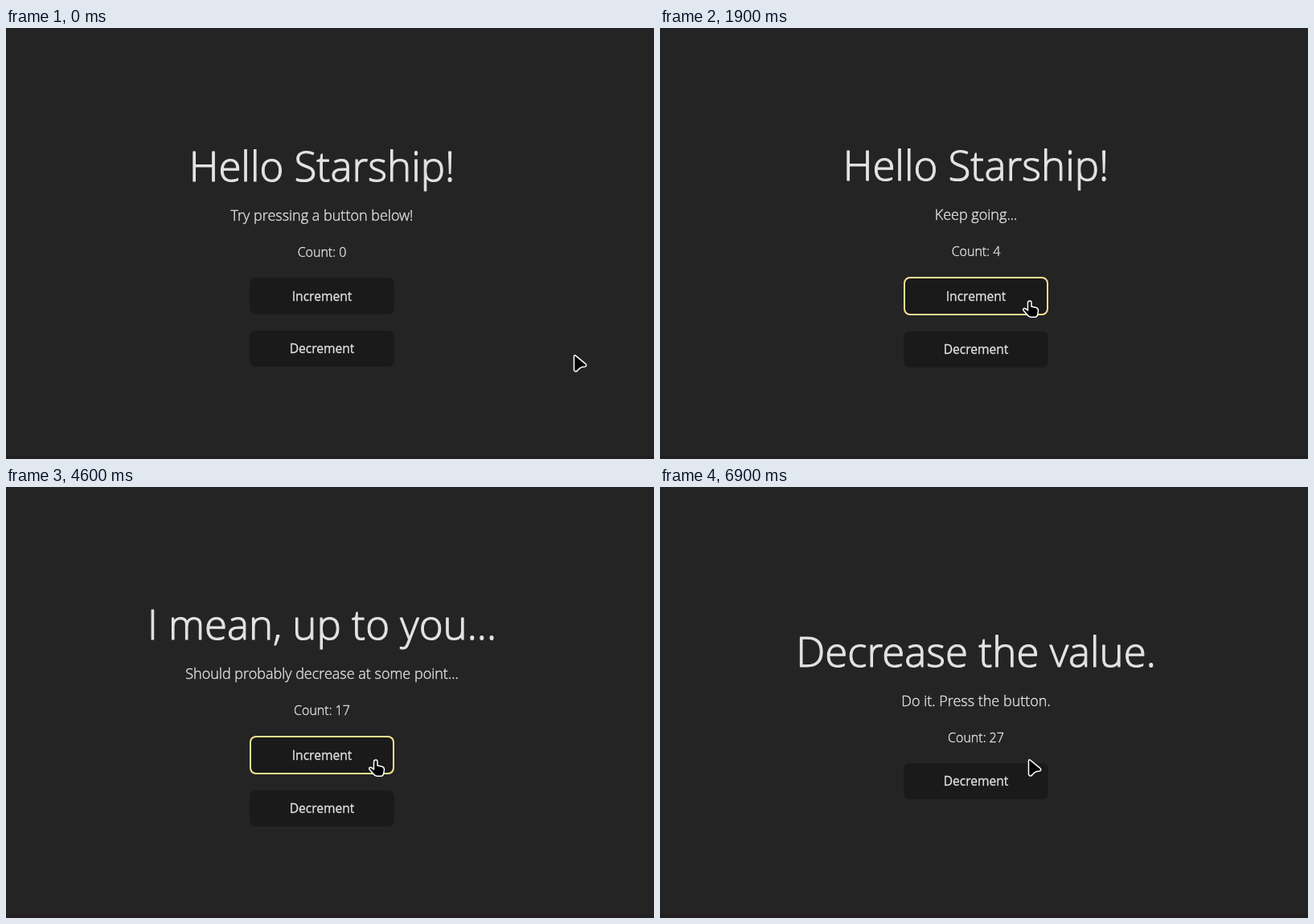
An HTML page that plays this animation: 806x537 px, repeating every 8 s.

```html
<!DOCTYPE html>
<html lang="en">
<head>
<meta charset="utf-8">
<title>Counter</title>
<style>
  html, body { margin: 0; width: 100%; height: 100%; overflow: hidden; background: #242424; }
  svg { display: block; }
  text {
    font-family: "Open Sans", "Noto Sans", sans-serif; font-weight: 300; text-anchor: middle;
    fill: #e3e3e3; stroke: #e3e3e3; stroke-width: .4; stroke-linejoin: round;
  }
  #title { font-size: 51px; stroke-width: 1.1; }
  #hint { font-size: 18px; }
  #count { font-size: 16px; }
  .label { font-size: 15.6px; font-weight: 500; stroke-width: .3; }
  .face { fill: #1a1a1a; }
  #ring { fill: none; stroke: #f7e290; stroke-width: 2; }
  #pointer path { fill: #000; stroke: #fff; stroke-width: 1.5; stroke-linejoin: round; }
</style>
</head>
<body>
<svg width="806" height="537" viewBox="0 0 806 537">
  <rect width="806" height="537" fill="#242424"/>
  <rect y="533" width="806" height="4" fill="#211f20"/>
  <text id="title" x="393"></text>
  <text id="hint" x="393"></text>
  <text id="count" x="393"></text>
  <g id="inc">
    <rect id="incFace" class="face"/>
    <rect id="ring" x="304" y="311" width="178" height="46" rx="7"/>
    <text class="label" x="393" y="340">Increment</text>
  </g>
  <g id="dec">
    <rect class="face" x="303" width="180" height="45" rx="8"/>
    <text class="label" x="393" y="28">Decrement</text>
  </g>
  <g id="pointer">
    <path id="arrow" d="M0 1.5Q0 -1 2.2 .3L14.6 10.6Q16.4 13 13.5 14Q8 14 4.6 18.6Q1.5 21.5 0 18Z"/>
    <path id="hand" transform="translate(1.5)" d="M-2.5 12V2.2Q-2.3 0 0 0Q2 0 2 2.2V7L7.5 8.2Q10.5 9 10.5 12L9.8 16.5Q9 20.3 6.5 20.3H1.5Q-1 20.3 -3 17.5L-8 11.7Q-9 9.5 -6.5 9.2Q-5 9.2 -2.5 12Z"/>
  </g>
</svg>
<script>
const LOOP = 8000, TICK = 100;
const HOVER = 800, GONE = 6800, LEAVE = 6900;

// Runs of clicks, one every 200 ms: [first, last]
const RUNS = [[1300, 2900], [3200, 5200], [5600, 6800]];

// [lowest count, title, hint]
const LINES = [
  [27, "Decrease the value.", "Do it. Press the button."],
  [21, "I mean, up to you...", "Decrease now?"],
  [11, "I mean, up to you...", "Should probably decrease at some point..."],
  [1, "Hello Starship!", "Keep going..."],
  [0, "Hello Starship!", "Try pressing a button below!"]
];

const $ = id => document.getElementById(id);
const set = (el, attrs) => { for (const k in attrs) el.setAttribute(k, attrs[k]); };
const show = (el, on) => { el.style.display = on ? "" : "none"; };
const clamp = v => Math.min(1, Math.max(0, v));
const say = (id, text, y) => {
  const el = $(id);
  if (el.textContent !== text) el.textContent = text;
  el.setAttribute("y", y);
};

const clicks = t => RUNS.reduce((n, [a, b]) =>
  t < a ? n : n + Math.floor((Math.min(t, b) - a) / 200) + 1, 0);

function draw(time) {
  const t = Math.floor(time / TICK) * TICK;
  const n = clicks(t);
  const [, title, hint] = LINES.find(line => n >= line[0]);
  const gone = t >= GONE, hover = t >= HOVER && !gone;
  const top = gone ? 34 : hover ? 0 : 1;

  say("title", title, 190 + top);
  say("hint", hint, 239 + top);
  say("count", "Count: " + n, 284 + top);

  show($("inc"), !gone);
  set($("incFace"), hover
    ? { x: 305, y: 312, width: 176, height: 44, rx: 6 }
    : { x: 303, y: 311, width: 180, height: 45.7, rx: 8 });
  const fade = clamp((t - HOVER) / 250);
  $("ring").style.opacity = hover ? 1 - (1 - fade) ** 2 : 0;
  $("dec").setAttribute("transform", `translate(0 ${gone ? 344 : hover ? 378 : 377})`);

  // The pointer slides left first, then climbs to the button.
  const u = clamp((t - 100) / 880);
  const p = u ** 3 * (10 - 15 * u + 6 * u * u);
  const x = 706.5 - 248 * p, y = 408 - 68 * p ** 2.2;
  $("pointer").setAttribute("transform", `translate(${x.toFixed(1)} ${y.toFixed(1)})`);
  const hand = t >= HOVER && t < LEAVE;
  show($("hand"), hand);
  show($("arrow"), !hand);
}

const start = performance.now();
function loop(now) {
  draw(Math.max(0, now - start) % LOOP);
  requestAnimationFrame(loop);
}
draw(0);
requestAnimationFrame(loop);
</script>
</body>
</html>
```
